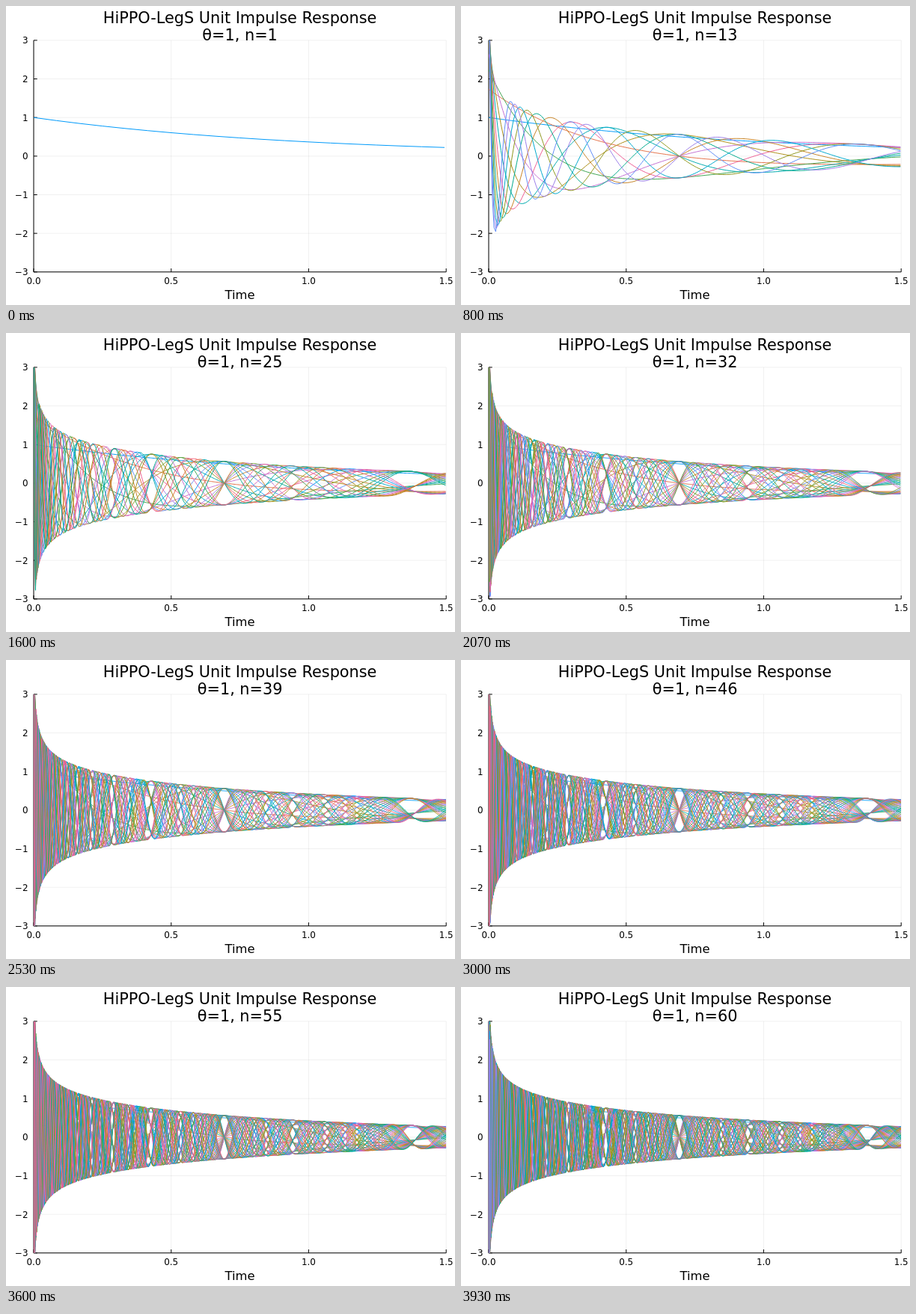
An HTML page that plays this animation: 600x400 px, repeating every 3990 ms.

```html
<!DOCTYPE html>
<html lang="en">
<head>
<meta charset="utf-8">
<title>HiPPO-LegS Unit Impulse Response</title>
<style>
  html, body { margin: 0; width: 100%; height: 100%; overflow: hidden; background: #fff; }
  svg { display: block; width: 600px; height: 400px; }
  text { font-family: "DejaVu Sans", sans-serif; fill: #000; }
  .title { font-size: 20.8px; text-anchor: middle; }
  .guide { font-size: 16.35px; text-anchor: middle; }
  .xtick { font-size: 11.9px; text-anchor: middle; }
  .ytick { font-size: 11.9px; text-anchor: end; }
  .grid { stroke: #000; stroke-opacity: .06; }
  .axis { stroke: #000; fill: none; }
  .curve { fill: none; stroke-linejoin: round; }
</style>
</head>
<body>
<svg id="stage" viewBox="0 0 600 400"></svg>
<script>
const LOOP = 3990, STEP = 200 / 3, MAX_ORDER = 60, T_END = 1.5;
const box = { left: 37, right: 588.19, top: 45.9, bottom: 355.8 };
const COLORS = ['#009AFA', '#E36F47', '#3EA44E', '#C371D2', '#AC8E18', '#00AAAE', '#ED5E93', '#C68225',
  '#00A98D', '#8E971E', '#00A9CC', '#9B7FE9', '#618DF6', '#F06073', '#DD65B6', '#6C9F33'];

const stage = document.getElementById('stage');
const px = t => box.left + t / T_END * (box.right - box.left);
const py = v => box.top + (3 - v) / 6 * (box.bottom - box.top);

function add(parent, tag, attrs, text) {
  const el = document.createElementNS('http://www.w3.org/2000/svg', tag);
  for (const key in attrs) el.setAttribute(key, attrs[key]);
  if (text !== undefined) el.textContent = text;
  return parent.appendChild(el);
}
const line = (cls, x1, y1, x2, y2) => add(stage, 'line', { class: cls, x1, y1, x2, y2 });
const label = (cls, x, y, text) => add(stage, 'text', { class: cls, x, y }, text);

const midX = (box.left + box.right) / 2;
const xTicks = [0, 0.5, 1, 1.5], yTicks = [-3, -2, -1, 0, 1, 2, 3];

for (const t of xTicks) {
  const x = px(t);
  line('grid', x, box.top, x, box.bottom);
  line('axis', x, box.bottom, x, box.bottom - 4.7);
  label('xtick', x, 372, t.toFixed(1));
}
for (const v of yTicks) {
  const y = py(v);
  line('grid', box.left, y, box.right, y);
  line('axis', box.left, y, box.left + 4.7, y);
  label('ytick', 29.5, y + 4.4, String(v).replace('-', '\u2212'));
}
add(stage, 'path', { class: 'axis', d: `M${box.left} ${box.top}V${box.bottom}H${box.right}` });
label('title', midX, 23.4, 'HiPPO-LegS Unit Impulse Response');
label('guide', midX, 392, 'Time');
const subtitle = label('title', midX, 46, '');

const clip = add(add(stage, 'defs'), 'clipPath', { id: 'plot' });
add(clip, 'rect', { x: box.left, y: box.top, width: box.right - box.left, height: box.bottom - box.top });
const plot = add(stage, 'g', { 'clip-path': 'url(#plot)' });
const curves = Array.from({ length: MAX_ORDER }, (_, k) =>
  add(plot, 'path', { class: 'curve', stroke: COLORS[k % COLORS.length] }));

// State k responds with sqrt(2k+1) e^-t P_k(2e^-t - 1), P_k being the Legendre polynomials.
function impulsePaths(order) {
  const dt = Number((1 / (12 * order)).toPrecision(2));
  const paths = Array.from({ length: order }, () => []);
  const samples = Math.floor(T_END / dt + 1e-9);
  for (let i = 0; i <= samples; i++) {
    const decay = Math.exp(-i * dt), z = 2 * decay - 1;
    const x = Math.round(px(i * dt) * 100) / 100;
    let prev = 0, p = 1;
    for (let k = 0; k < order; k++) {
      const y = py(Math.sqrt(2 * k + 1) * decay * p);
      paths[k].push(x + ' ' + Math.round(y * 100) / 100);
      [prev, p] = [p, ((2 * k + 1) * z * p - k * prev) / (k + 1)];
    }
  }
  return paths.map(points => 'M' + points.join('L'));
}

// Steps of 1/15 s start on whole hundredths of a second.
const stepStart = n => Math.round((n - 1) * STEP / 10) * 10;
function orderAt(ms) {
  let n = Math.min(MAX_ORDER, Math.floor(ms / STEP) + 2);
  while (stepStart(n) > ms) n--;
  return n;
}

let shown = 0;
function render(ms) {
  const order = orderAt(ms % LOOP);
  if (order === shown) return;
  shown = order;
  subtitle.textContent = `θ=1, n=${order}`;
  const paths = impulsePaths(order);
  curves.forEach((curve, k) => curve.setAttribute('d', paths[k] || ''));
}

const start = performance.now();
function tick() {
  render(performance.now() - start);
  requestAnimationFrame(tick);
}
tick();
</script>
</body>
</html>
```
